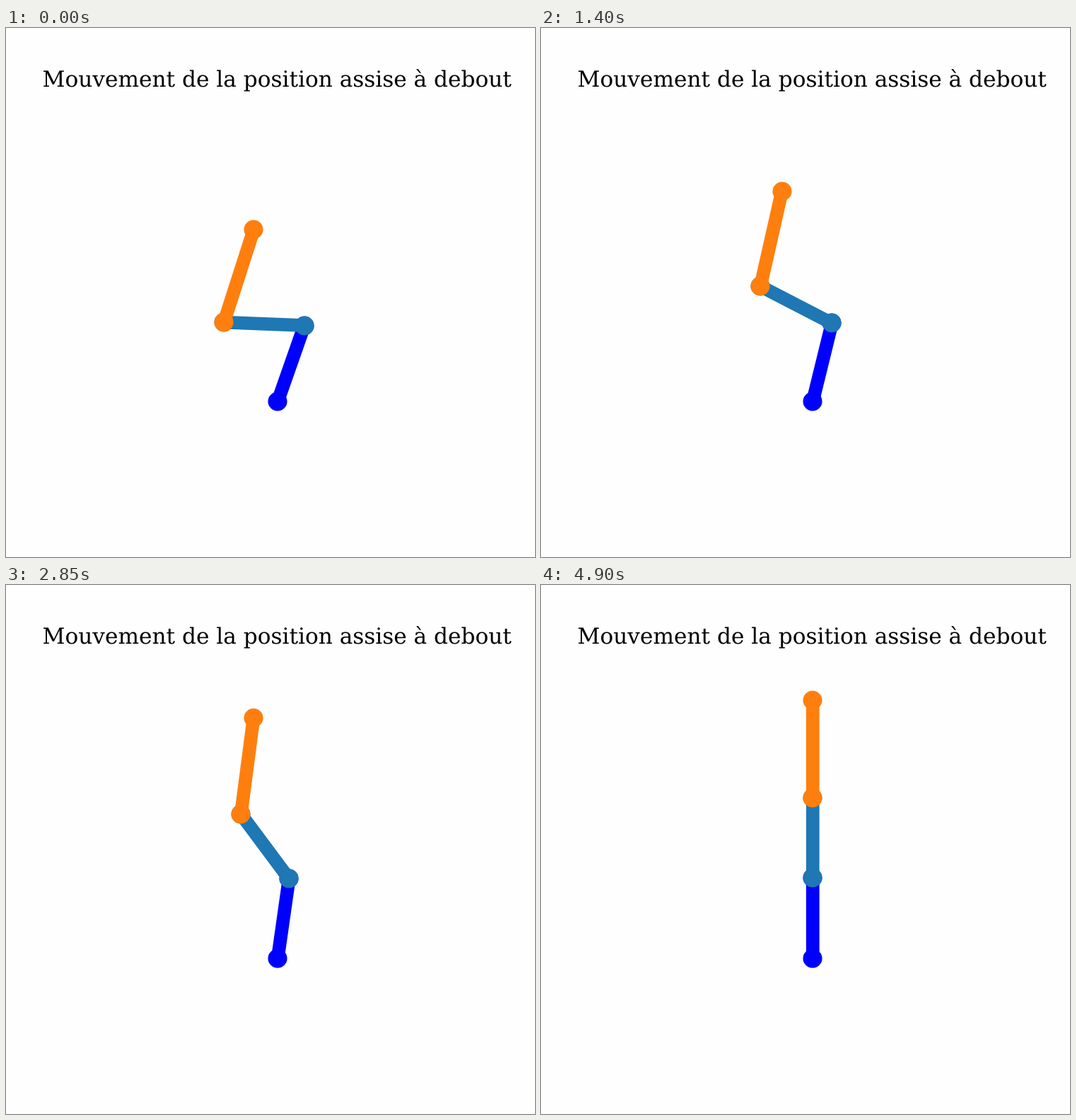
An HTML page for the animation above (4950 ms loop, 748 px wide and 748 px high).

```html
<!DOCTYPE html>
<html lang="fr">
<meta charset="utf-8">
<title>Mouvement de la position assise à debout</title>
<style>
  html, body { margin: 0; height: 100%; overflow: hidden; background: #fefefe; }
  svg { display: block; width: 100%; height: 100%; }
  text { font: 31.18px "DejaVu Serif", "Noto Serif", serif; text-rendering: geometricPrecision; }
  .bone { stroke-width: 18.75; }
  .joints { stroke-width: 27.08; stroke-linecap: round; }
</style>
<svg viewBox="0 0 748 748">
  <text x="51.6" y="83">Mouvement de la position assise à debout</text>
</svg>
<script>
const STEP = 50, STEPS = 99;
const ANKLE = [384.25, 527.9];
const svg = document.querySelector('svg');

function addPath(className, stroke) {
  const path = document.createElementNS(svg.namespaceURI, 'path');
  path.setAttribute('class', className);
  path.setAttribute('stroke', stroke);
  return svg.appendChild(path);
}

// Seated angles are measured in degrees from the vertical.
const limbs = [
  { length: 113.7, seated: 19.3, color: '#0000ff' },
  { length: 113.7, seated: -87.75, color: '#1f77b4' },
  { length: 137.3, seated: 17.8, color: '#ff7f0e' },
].map(limb => ({
  ...limb,
  bone: addPath('bone', limb.color),
  joints: addPath('joints', limb.color),
}));

// Joints sit on whole pixels, bones do not.
const dot = (x, y) => `M${Math.round(x)} ${Math.round(y)}h0`;

function draw(now) {
  const step = Math.floor(now / STEP) % STEPS;
  const bend = 1 - step / (STEPS - 1);
  let [x, y] = ANKLE;
  for (const { length, seated, bone, joints } of limbs) {
    const angle = seated * bend * Math.PI / 180;
    const endX = x + length * Math.sin(angle);
    const endY = y - length * Math.cos(angle);
    bone.setAttribute('d', `M${x} ${y}L${endX} ${endY}`);
    joints.setAttribute('d', dot(x, y) + dot(endX, endY));
    [x, y] = [endX, endY];
  }
  requestAnimationFrame(draw);
}
draw(0);
</script>
</html>
```
